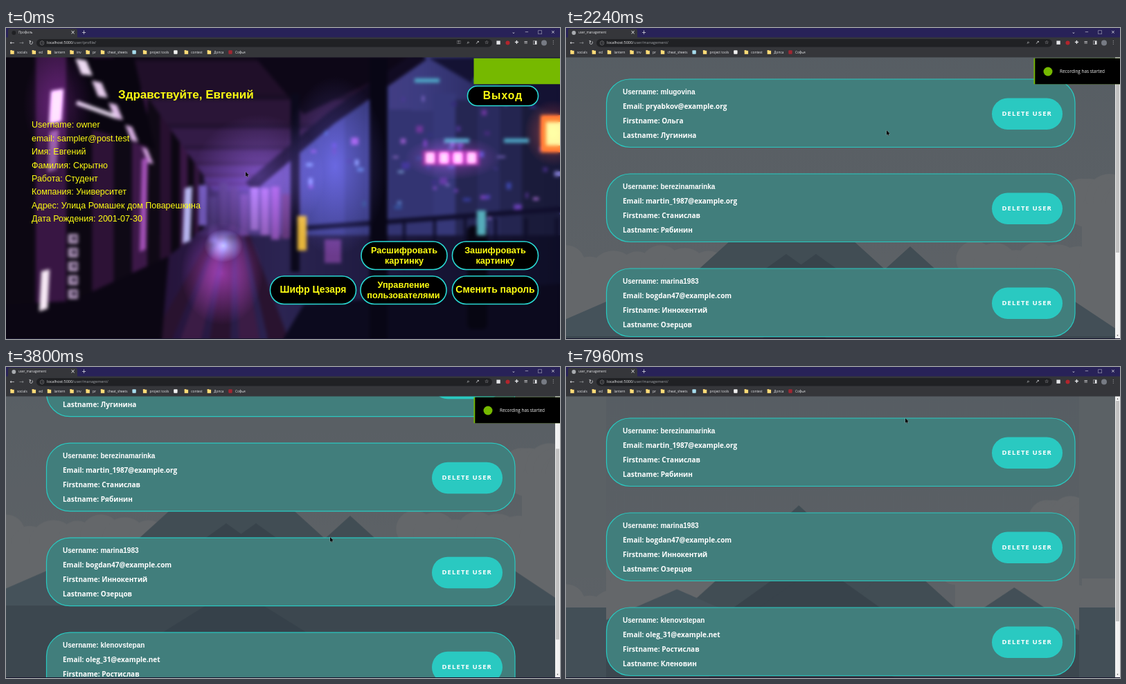
Recreate the animation shown at these times as an HTML page with a canvas. Size 800 by 450 pixels, loop 8000 ms.

```html
<!DOCTYPE html>
<html lang="ru">
<head>
<meta charset="utf-8">
<title>Профиль</title>
<style>
html, body { margin: 0; width: 100%; height: 100%; overflow: hidden; background: #000; }
canvas { display: block; width: 800px; height: 450px; }
</style>
</head>
<body>
<canvas id="stage" width="800" height="450"></canvas>
<script>
const W = 800, H = 450, TOP = 43, LOOP = 8000;
const ARIAL = '"Liberation Sans", Arial, sans-serif';
const OPEN = '"Open Sans", "Noto Sans", sans-serif';
const SIGNS = '"DejaVu Sans", sans-serif';
const TEAL = '#2ac9c1', YELLOW = '#ffff12', GREEN = '#76b900', INK = '#e4e5e8';
const T = { load: 1200, hover: 4480, dialog: 4840, toastOut: 5260, statusOff: 5420, closed: 6760, reload: 6960 };

const ctx = document.getElementById('stage').getContext('2d');

// ---- drawing helpers ----
function rect(c, fill, x, y, w, h) { c.fillStyle = fill; c.fillRect(x, y, w, h); }
function trace(c, p) {
  c.beginPath();
  for (let i = 0; i < p.length; i += 2) c.lineTo(p[i], p[i + 1]);
}
function poly(c, fill, ...p) {
  trace(c, p);
  c.fillStyle = fill;
  c.fill();
}
function line(c, stroke, width, ...p) {
  trace(c, p);
  c.strokeStyle = stroke;
  c.lineWidth = width;
  c.stroke();
}
function disc(c, fill, x, y, r) {
  c.beginPath();
  c.arc(x, y, r, 0, 7);
  c.fillStyle = fill;
  c.fill();
}
function pill(c, fill, stroke, width, x, y, w, h, r) {
  c.beginPath();
  c.roundRect(x, y, w, h, r);
  if (fill) { c.fillStyle = fill; c.fill(); }
  if (stroke) { c.strokeStyle = stroke; c.lineWidth = width; c.stroke(); }
}
function glow(c, rgb, alpha, x, y, rx, ry) {
  c.save();
  c.translate(x, y);
  c.scale(rx, ry);
  const g = c.createRadialGradient(0, 0, 0, 0, 0, 1);
  g.addColorStop(0, `rgba(${rgb},${alpha})`);
  g.addColorStop(1, `rgba(${rgb},0)`);
  rect(c, g, -1, -1, 2, 2);
  c.restore();
}
function fade(c, x, y, ...colours) {
  const g = c.createLinearGradient(0, 0, x, y);
  colours.forEach((s, i) => g.addColorStop(i / (colours.length - 1), s));
  return g;
}
function text(str, x, y, font, fill, align = 'left', spacing = 0) {
  ctx.font = font;
  ctx.fillStyle = fill;
  ctx.textAlign = align;
  ctx.letterSpacing = spacing + 'px';
  ctx.fillText(str, x, y);
  const width = ctx.measureText(str).width;
  ctx.letterSpacing = '0px';
  return width;
}
function layer(w, h, paint) {
  const c = document.createElement('canvas');
  c.width = w;
  c.height = h;
  paint(c.getContext('2d'));
  return c;
}
function random(seed) {
  return (lo, hi) => {
    seed = (seed * 16807) % 2147483647;
    return lo + (hi - lo) * seed / 2147483647;
  };
}

// ---- motion: eased moves between two times ----
function ramp(t, a, b) {
  const k = Math.max(0, Math.min(1, (t - a) / (b - a)));
  return k * k * (3 - 2 * k);
}
const moves = [
  { from: 120, to: 740, x: 574, y: 382 },
  { from: 1320, to: 2100, x: 463, y: 148 },
  { from: 2560, to: 3000, x: 468, y: 246 },
  { from: 4080, to: 4600, x: 647, y: 131 },
  { from: 5360, to: 6080, x: 476, y: 68 },
  { from: 6800, to: 7500, x: 490, y: 74 }
];
function pointer(t) {
  let x = 346, y = 208;
  for (const m of moves) {
    const k = ramp(t, m.from, m.to);
    x += (m.x - x) * k;
    y += (m.y - y) * k;
  }
  return [x, y];
}
const scrollAt = t => 115 * (ramp(t, 2800, 3560) - ramp(t, 3700, 4160));

// ---- neon passage, drawn toward one vanishing point ----
const VX = 320, VY = 262;
const wallY = (x, slope) => VY + (VX - x) * slope;

function towers(c, rnd) {
  for (let i = 0; i < 12; i++) {
    const x = 425 + i * 32;
    rect(c, `hsl(239 38% ${44 - i * 2.4 + rnd(-5, 5)}%)`, x, rnd(45, 120), 33, 250);
  }
  for (let i = 0; i < 80; i++) {
    rect(c, `hsl(${rnd(215, 275)} 48% ${rnd(32, 66)}%)`, rnd(430, 800), rnd(75, 270), rnd(3, 12), rnd(2, 11));
  }
  poly(c, '#141233', 610, TOP, W, TOP, W, 125, 690, 90);
}
function roof(c) {
  const left = y => VX - (VY - y) * .8, right = y => 590 - (y - TOP) * 1.25;
  for (let i = 0; i < 7; i++) {
    const y = VY - 219 * .74 ** i, next = VY - 219 * .74 ** (i + 1);
    poly(c, `hsl(${279 - i * 3} 45% ${11 + i * 4}%)`, left(y), y, right(y), y, right(next), next, left(next), next);
    line(c, `hsl(272 45% ${7 + i * 3}%)`, 9 - i, left(y), y, right(y), y);
  }
  poly(c, '#0d0717', 360, TOP, 600, TOP, 430, 125);
  line(c, '#110b22', 18, 602, 38, 470, 130, 352, 230);
}
function ground(c) {
  rect(c, fade(c, W, 0, '#0b0616', '#251137', '#2b2452', '#181536', '#0e0e26'), 0, 300, W, 150);
  for (let i = 0; i < 5; i++) {
    const x = 210 + i * 42;
    poly(c, `hsl(286 42% ${13 + (i % 2) * 6}%)`, x, H, 296 + i * 12, 300, 304 + i * 12, 300, x + 30, H);
  }
  poly(c, '#0c0a1e', 430, 400, W, 370, W, H, 400, H);
}
function wall(c, rnd) {
  for (let i = 0; i < 13; i++) {
    const a = VX - 330 * .84 ** i, b = VX - 330 * .84 ** (i + 1);
    const fill = i % 2 ? `hsl(285 50% ${rnd(12, 19)}%)` : `hsl(268 42% ${rnd(4, 7)}%)`;
    poly(c, fill, a, wallY(a, -1.4), b, wallY(b, -1.4), b, wallY(b, .8), a, wallY(a, .8));
  }
  poly(c, '#090510', 90, TOP, 185, TOP, 215, 175, 105, 140);
  poly(c, '#0b0613', 0, 400, 95, 395, 235, 330, 225, H, 0, H);
}
function lamps(c) {
  for (let i = 0; i < 5; i++) {
    const x = 100 + i * 24, y = 44 + i * 32, w = 16 - i * 2;
    poly(c, `hsl(288 45% ${90 - i * 4}%)`, x, y, x + w, y + 3, x + w + 9, y + 25, x + 9, y + 23);
    rect(c, '#b198bd', 90, 298 + i * 20, 14, 14);
    rect(c, '#1c1028', 95, 302 + i * 20, 6, 5);
  }
  line(c, '#eadcf1', 6, 102, 108, 158, 128);
  const strip = (fill, x, y, w, h) => poly(c, fill, x + 3, y, x + w + 3, y - 3, x + w, y + h, x, y + h + 4);
  strip('#f3d9f8', 62, 91, 18, 44);
  strip('#8f5b9d', 60, 150, 13, 55);
  strip('#f6e8f5', 48, 352, 12, 54);
  strip('#a04fb4', 193, 190, 9, 130);
  strip('#b6b4ee', 255, 232, 11, 76);
}
function street(c, rnd) {
  for (let i = 0; i < 9; i++) {
    rect(c, `hsl(${255 + i * 3} 38% ${rnd(32, 66)}%)`, 278 + i * 15, rnd(222, 245), 12, rnd(55, 80));
  }
  for (let x = 575; x < W; x += 44) line(c, '#0e0d28', 4, x, 275, x, 350);
  line(c, '#100e2c', 7, 424, 290, W, 262);
  rect(c, '#0b091b', 411, 95, 13, 258);
  rect(c, '#080615', 525, TOP, 26, H);
  pill(c, '#070612', null, 0, 666, 286, 29, 150, 8);
  rect(c, '#6b3b8c', 460, 306, 24, 34);
  rect(c, '#55acba', 680, 264, 13, 36);
  rect(c, '#e5b53b', 421, 272, 13, 50);
}
function neon(c) {
  rect(c, '#7b2a88', 601, 177, 83, 22);
  for (let i = 0; i < 4; i++) {
    rect(c, '#ffc7f0', 606 + i * 20, 180, 13, 16);
    rect(c, '#4fa9c8', 590 + i * 43, [73, 160][i % 2], 36, 6);
  }
  rect(c, '#ed7430', 772, 126, 28, 54);
  rect(c, '#ffe19a', 780, 136, 20, 34);
}
const sharpCity = layer(W, H, c => {
  const rnd = random(77);
  rect(c, fade(c, W, 0, '#0a0614', '#1a0b2b', '#554290', '#3c3c80', '#17183f'), 0, 0, W, H);
  towers(c, rnd);
  roof(c);
  ground(c);
  wall(c, rnd);
  lamps(c);
  street(c, rnd);
  neon(c);
});
const city = layer(W, H, c => {
  c.drawImage(sharpCity, 0, 0);
  c.filter = 'blur(2.4px)';
  c.drawImage(sharpCity, 0, 0);
  c.filter = 'none';
  c.globalCompositeOperation = 'lighter';
  glow(c, '95,70,150', .6, 365, 215, 95, 90);
  glow(c, '75,70,150', .6, 475, 200, 75, 130);
  glow(c, '140,50,150', .75, 312, 355, 60, 75);
  glow(c, '120,175,200', .85, 314, 315, 28, 24);
  glow(c, '90,25,105', .5, 75, 110, 50, 80);
  glow(c, '170,45,150', .45, 645, 188, 70, 32);
  glow(c, '210,65,25', .5, 790, 152, 42, 48);
});

// ---- mountain picture behind the user list ----
const hills = layer(W, 700, c => {
  const rnd = random(9);
  rect(c, fade(c, 0, 500, '#565d63', '#5f6367'), 0, 0, W, 700);
  const cloud = (x, y, span) => {
    for (let i = 0; i < 8; i++) disc(c, '#64676a', x + span * i / 7, y + rnd(-6, 14), rnd(26, 36));
    rect(c, '#64676a', x, y + 8, span, 300);
  };
  const peak = (fill, x, y, run) => poly(c, fill, x, y, x + run * 500, y + 500, x - run * 500, y + 500);
  cloud(0, 348, 240);
  cloud(590, 340, 210);
  cloud(745, 247, 70);
  peak('#414d54', 326, 227, 1.1);
  peak('#414d54', 497, 316, 1.1);
  peak('#38434b', 318, 327, 1.4);
  peak('#38434b', 361, 327, 1.4);
  peak('#45525a', 120, 369, 2.3);
  peak('#434f57', 690, 366, 1.5);
  rect(c, '#3c474f', 0, 446, W, 254);
  peak('#36414a', 330, 420, 1.6);
});

// ---- pages ----
function button(x, y, ...lines) {
  pill(ctx, '#000', '#29d8d2', 1.6, x, y, 124, 40.5, 20);
  const size = lines.length > 1 ? 12.7 : 13.9;
  lines.forEach((s, i) => text(s, x + 62, y + 20.5 + (i - (lines.length - 1) / 2) * 15,
    `bold ${size}px ${ARIAL}`, YELLOW, 'center'));
}
const profile = [
  'Username: owner', 'email: sampler@post.test', 'Имя: Евгений', 'Фамилия: Скрытно', 'Работа: Студент',
  'Компания: Университет', 'Адрес: Улица Ромашек дом Поварешкина', 'Дата Рождения: 2001-07-30'
];
function profilePage() {
  ctx.drawImage(city, 0, 0);
  text('Здравствуйте, Евгений', 162, 97.5, `bold 17px ${ARIAL}`, YELLOW);
  profile.forEach((s, i) => text(s, 37, 141 + i * 19.4, `12.5px ${ARIAL}`, YELLOW));
  pill(ctx, '#000', '#29d8d2', 1.6, 666.5, 84, 102, 28.5, 14);
  text('Выход', 717.5, 99, `bold 15.6px ${ARIAL}`, YELLOW, 'center', 1.1);
  button(513, 309, 'Расшифровать', 'картинку');
  button(644.5, 309, 'Зашифровать', 'картинку');
  button(381.5, 359, 'Шифр Цезаря');
  button(512, 359, 'Управление', 'пользователями');
  button(644.5, 359, 'Сменить пароль');
}

const users = [
  ['mlugovina', 'pryabkov@example.org', 'Ольга', 'Лугинина'],
  ['berezinamarinka', 'martin_1987@example.org', 'Станислав', 'Рябинин'],
  ['marina1983', 'bogdan47@example.com', 'Иннокентий', 'Озерцов'],
  ['klenovstepan', 'oleg_31@example.net', 'Ростислав', 'Кленовин']
];
const labels = ['Username: ', 'Email: ', 'Firstname: ', 'Lastname: '];
function card(user, y, hover) {
  pill(ctx, '#417e7c', TEAL, 1.2, 58.5, y, 676.5, 98.5, 34);
  user.forEach((s, i) => text(labels[i] + s, 82, y + 19 + i * 21.2, `bold 10px ${i ? OPEN : ARIAL}`, '#fff'));
  pill(ctx, hover ? '#2bb8b2' : TEAL, null, 0, 615, y + 27.5, 102, 45.5, 22.7);
  text('DELETE USER', 665.7, y + 50.5, `bold 9.5px ${OPEN}`, '#fff', 'center', 1.1);
}
function listPage(t, scroll) {
  const fresh = t >= T.reload;
  ctx.save();
  if (fresh) {
    // the shorter page shows the same picture scaled down from its top centre
    ctx.translate(396, TOP);
    ctx.scale(1 / 1.17, 1 / 1.17);
    ctx.translate(-396, -TOP);
    rect(ctx, '#5b6165', -80, 0, 960, 350);
    rect(ctx, '#434f57', -80, 400, 960, 200);
  }
  ctx.drawImage(hills, 0, -scroll);
  ctx.restore();
  users.slice(fresh ? 1 : 0).forEach((u, i) =>
    card(u, 74 + i * 137 - scroll, !fresh && i === 0 && t >= T.hover));
  rect(ctx, '#f1f1f1', 793, 42, 7, 408);
  rect(ctx, '#c1c1c1', 794, 49 + scroll * .688, 5, fresh ? 319 : 276);
  text('▴', 796.5, 46, `4px ${SIGNS}`, '#555', 'center');
  text('▾', 796.5, 445, `4px ${SIGNS}`, '#555', 'center');
}

// ---- browser frame ----
// a bookmark without a name is a lone icon
const bookmarks = [
  ['socials'], ['ed'], ['lantern'], ['inv'], ['pr'], ['cheat_sheets'], ['', '#a7dced'],
  ['project tools'], ['', '#f1f1f1'], ['contest'], ['Допса'], ['Софья', '#9f2732']
];
function bookmarkBar() {
  let x = 6.3;
  for (const [name, colour] of bookmarks) {
    if (colour) pill(ctx, colour, null, 0, x, 32.2, 5.4, 5.6, 1);
    else {
      rect(ctx, '#e9c463', x, 32, 2.7, 2);
      rect(ctx, '#ffdc78', x, 32.8, 5.4, 5);
    }
    x += name ? 16.5 + text(name, x + 9.6, 35.3, `4.8px ${OPEN}`, INK) : 15.5;
  }
}
function icons(chars, x, step, y, size, fill = INK) {
  [...chars].forEach((s, i) => text(s, x + i * step, y, `${size}px ${SIGNS}`, fill, 'center'));
}
function browser(onProfile) {
  rect(ctx, '#282258', 0, 0, W, 14);
  pill(ctx, '#35363a', null, 0, 3, 1, 100, 16, 3);
  rect(ctx, '#35363a', 0, 13.5, W, 29);
  disc(ctx, onProfile ? '#202124' : '#a9acb0', 11.3, 7, 2.9);
  text(onProfile ? 'Профиль' : 'user_management', 18, 7.2, `4.6px ${OPEN}`, INK);
  icons('×+', 96.5, 16, 7, 8);
  icons('⌄−□×', 733, 19, 6.5, 7);

  icons('←', 9, 0, 21.5, 8);
  icons('→', 22.5, 0, 21.5, 8, '#8b8d91');
  icons('↻', 36, 0, 21.5, 8);
  pill(ctx, '#202124', null, 0, 44, 16, 658, 11.5, 5.7);
  icons('ⓘ', 52, 0, 21.7, 6);
  const font = `5.5px ${OPEN}`;
  const host = text('localhost:5000', 59, 21.8, font, '#f0f0f2');
  text(onProfile ? '/user/profile/' : '/user/management/', 59 + host, 21.8, font, '#9fa2a7');
  icons(onProfile ? '⚿⌕↗☆' : ' ⌕↗☆', 654, 13.4, 21.5, 7);
  icons('■ ✚≡◨ ⋮', 711, 13.2, 21.5, 7);
  disc(ctx, '#b2252c', 724.5, 21.5, 3);
  disc(ctx, '#777b84', 777, 21.5, 4);
  bookmarkBar();
}

// ---- overlays ----
function toast(t) {
  const leave = ramp(t, T.toastOut + 240, T.toastOut + 480);
  if (leave >= 1) return;
  const shown = ramp(t, 140, 460) - ramp(t, T.toastOut, T.toastOut + 260);
  ctx.save();
  ctx.beginPath();
  ctx.rect(675, 43.5, 125, 38);
  ctx.clip();
  ctx.translate(leave * 125, 0);
  rect(ctx, GREEN, 675.5, 43.5, 125, 38);
  ctx.translate((1 - shown) * 124, 0);
  rect(ctx, '#000', 677.3, 43.5, 125, 38);
  disc(ctx, GREEN, 696, 63, 6.5);
  text('Recording has started', 713, 63.2, `6.4px ${OPEN}`, '#f2f2f2');
  ctx.restore();
}
function dialog(t) {
  if (t < T.dialog || t >= T.closed) return;
  const k = ramp(t, T.dialog, T.dialog + 130);
  ctx.save();
  ctx.globalAlpha = .4 + .6 * k;
  ctx.translate(0, (k - 1) * 3);
  ctx.shadowColor = 'rgba(0,0,0,.5)';
  ctx.shadowBlur = 4;
  pill(ctx, '#292a2d', null, 0, 306.5, 28, 187, 52.5, [0, 0, 2, 2]);
  ctx.shadowBlur = 0;
  text('localhost:5000 says', 313, 39.5, `5.7px ${OPEN}`, '#eeeef0');
  text('Пользователь успешно удален!', 313, 50.3, `4.8px ${OPEN}`, '#dfe0e3');
  pill(ctx, '#8ba9df', '#b7c8ee', 1.1, 459.8, 60.8, 27, 12.4, 2);
  text('OK', 473.3, 67.2, `4.8px ${OPEN}`, '#30384a', 'center');
  ctx.restore();
}
function status(t) {
  if (t < T.hover || t >= T.statusOff) return;
  rect(ctx, '#1f1c47', 0, 441, 79, 8);
  text('localhost:5000/user/delete/mlugovina', 2, 445.2, `4.3px ${OPEN}`, '#eceef2');
}
function cursor(t) {
  const hand = (t > 640 && t < T.load + 160) || (t >= T.hover && t < 5480);
  const edge = 'rgba(200,200,200,.55)', ink = '#08080a';
  ctx.save();
  ctx.translate(...pointer(t));
  if (hand) {
    pill(ctx, ink, edge, .5, -.5, 0, 1.7, 5, .8);
    pill(ctx, ink, edge, .5, -2, 3, 5.4, 4.2, 1.5);
  } else {
    const shape = [0, 0, 0, 7, 1.6, 5.6, 2.7, 7.8, 3.7, 7.3, 2.7, 5.2, 4.8, 5, 0, 0];
    line(ctx, edge, .9, ...shape);
    poly(ctx, ink, ...shape);
  }
  ctx.restore();
}

function draw(t) {
  const onProfile = t < T.load;
  ctx.textBaseline = 'middle';
  if (onProfile) profilePage();
  else listPage(t, scrollAt(t));
  browser(onProfile);
  status(t);
  rect(ctx, '#15132c', 0, 449, W, 1);
  dialog(t);
  toast(t);
  cursor(t);
}
const start = performance.now();
function tick() {
  draw((performance.now() - start) % LOOP);
  requestAnimationFrame(tick);
}
draw(0);
requestAnimationFrame(tick);
</script>
</body>
</html>
```
